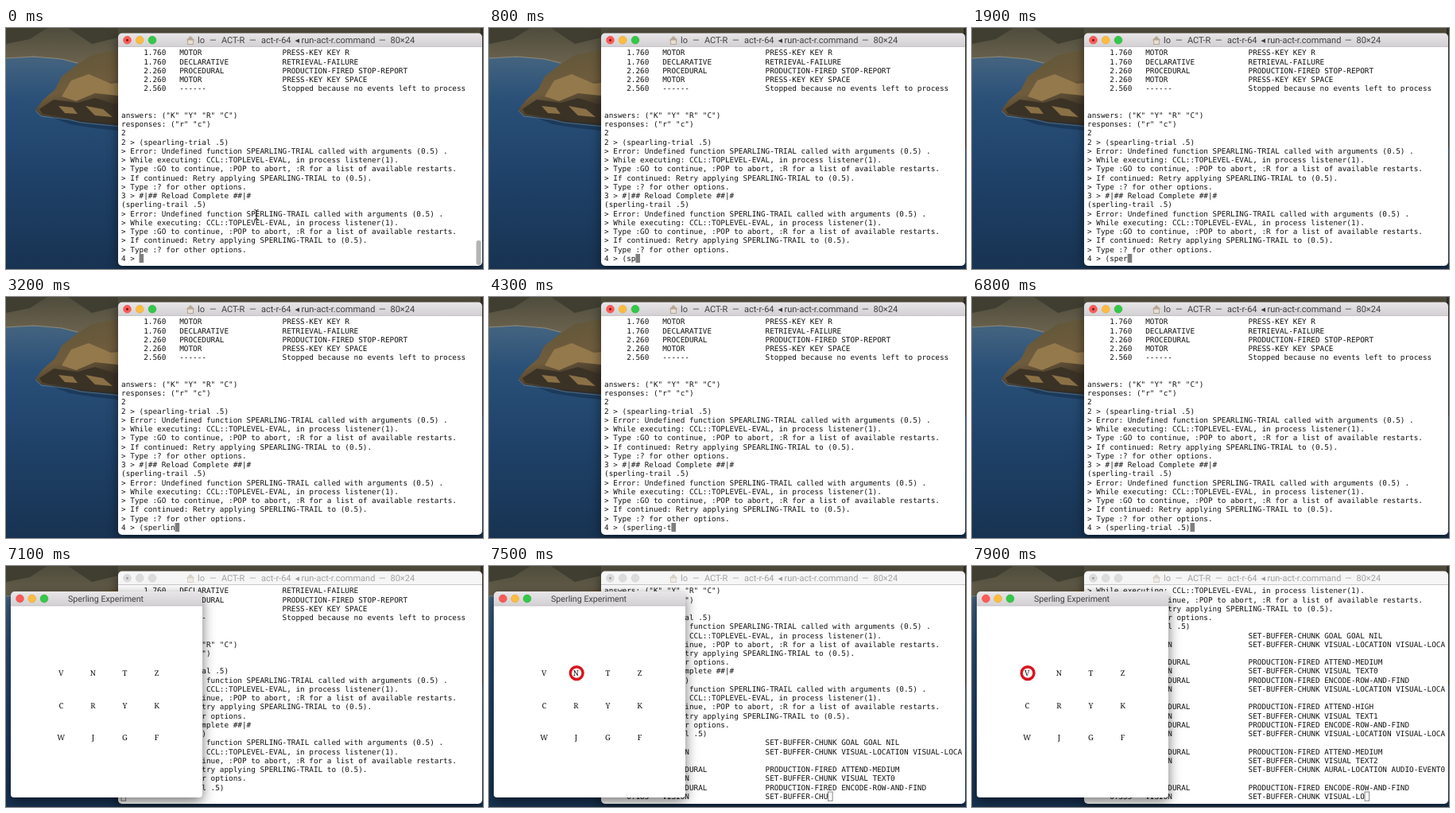
These frames come from a looping animation (600 by 303 pixels, 8 s). An HTML page:

```html
<!DOCTYPE html>
<html lang="en">
<head>
<meta charset="utf-8">
<title>Terminal session</title>
<style>
  html, body { margin: 0; width: 100%; height: 100%; overflow: hidden; background: #1c3c62; }
  svg { display: block; width: 600px; height: 303px; }
  text { text-rendering: geometricPrecision; white-space: pre; }
  #rows { font: 9.35px "DejaVu Sans Mono", monospace; fill: #111; }
  .title { font: 11px Roboto, sans-serif; fill: #404040; }
  #letters { font: 9.5px "Noto Serif", serif; fill: #111; text-anchor: middle; }
  .red { fill: #fc5b57; stroke: #df4744; }
  .yellow { fill: #fdbc40; stroke: #dea034; }
  .green { fill: #34c84a; stroke: #27aa35; }
  .lights circle { stroke-width: .5; }
  #term { filter: drop-shadow(0 4px 7px rgba(0, 0, 0, .5)); }
  #trial { filter: drop-shadow(0 5px 8px rgba(0, 0, 0, .55)); }
  #caret { fill: #7f7f7f; stroke: none; }
  .dot { fill: #7c120e; }
  .blur .lights circle { fill: #dcdcdc; stroke: #cbcbcb; }
  .blur .dot { fill: #a0a0a0; }
  .blur .title { fill: #a2a2a2; }
  .blur .bar { fill: #f6f6f6; }
  .blur .home { opacity: .45; }
  .blur #caret { fill: none; stroke: #777; stroke-width: .9; }
</style>
</head>
<body>
<svg viewBox="0 0 600 303">
  <defs>
    <linearGradient id="sea" x2="0" y2="1">
      <stop offset=".1" stop-color="#476680"/>
      <stop offset=".3" stop-color="#2a5078"/>
      <stop offset=".6" stop-color="#1f4269"/>
      <stop offset="1" stop-color="#183352"/>
    </linearGradient>
    <linearGradient id="hill" x2="0" y2="1">
      <stop offset="0" stop-color="#4f4c3c"/>
      <stop offset="1" stop-color="#6d6450"/>
    </linearGradient>
    <linearGradient id="land" x2=".3" y2="1">
      <stop offset="0" stop-color="#5d5538"/>
      <stop offset=".6" stop-color="#6f5c3d"/>
      <stop offset="1" stop-color="#352d23"/>
    </linearGradient>
    <linearGradient id="bar" x2="0" y2="1">
      <stop offset="0" stop-color="#e8e6e8"/>
      <stop offset="1" stop-color="#d2d0d2"/>
    </linearGradient>
  </defs>

  <rect width="600" height="303" fill="url(#sea)"/>
  <g id="coast">
    <path fill="url(#hill)" d="M0 0H600V12H150V48L95 46 70 39 35 36 0 38Z"/>
    <path fill="#3f3e31" d="M0 0H52L30 14 0 20Z M78 0H141V12L108 20Z"/>
    <path fill="none" stroke="#a39a85" stroke-width="1.200" opacity=".7" d="M0 38L35 36 70 39 90 44"/>
    <path fill="#14304c" opacity=".6" d="M36 104L80 121 112 126 150 130V110Z"/>
    <path fill="url(#land)" d="M150 26L108 34 88 47 70 61 62 77 46 91 37 103 44 110 78 114 95 118 150 123Z"/>
    <path fill="#94794c" d="M82 66L104 58 132 70 150 68V86L112 82 88 92 70 86Z"/>
    <path fill="#3b3226" d="M60 90L90 94 112 88 150 100V120L108 118 78 113 46 108 42 102Z"/>
    <path fill="#8a7046" d="M66 98L84 100 90 108 74 107Z M100 98L122 102 134 112 112 110Z"/>
    <path fill="none" stroke="#a9b3b0" stroke-width=".8" opacity=".5" d="M37 104L44 111 78 115 95 119 145 124"/>
    <path fill="#332d24" d="M597 0H600V150H597Z"/>
  </g>

  <g id="term">
    <path fill="#fff" d="M141 23H599V294a5 5 0 0 1 -5 5H146a5 5 0 0 1 -5 -5Z"/>
    <path class="bar" fill="url(#bar)" d="M141 23.500V11.500a5 5 0 0 1 5 -5H594a5 5 0 0 1 5 5V23.500Z"/>
    <path stroke="#b9b7b9" stroke-width=".7" d="M141 23.500H599"/>
    <g class="lights">
      <circle class="red" cx="152.500" cy="15.200" r="4.900"/>
      <circle class="yellow" cx="168.200" cy="15.200" r="4.900"/>
      <circle class="green" cx="184" cy="15.200" r="4.900"/>
    </g>
    <ellipse class="dot" cx="152.500" cy="15.200" rx="1.500" ry="1.500"/>
    <g class="home">
      <path fill="#e9dfd0" stroke="#9d8f80" stroke-width=".7" d="M228.500 15V20.500H235.500V15"/>
      <path fill="#b7a797" d="M226.500 15.500 L232 10 237.500 15.500Z"/>
    </g>
    <g class="title" id="heading"></g>
    <g id="rows"></g>
    <rect id="caret" width="5.600" height="11.200"/>
    <rect id="thumb" x="591.500" y="267" width="6" height="31" rx="3" fill="#b4b4b4"/>
    <path id="pointer" fill="none" stroke="#222" stroke-width="1" d="M312.500 228.500q2.500 0 2.500 2V239q0 2 -2.500 2M317.500 228.500q-2.500 0 -2.500 2M315 239q0 2 2.500 2M313.500 236H316.500"/>
  </g>

  <g id="trial">
    <path fill="#fff" d="M6 49H247V287a4 4 0 0 1 -4 4H10a4 4 0 0 1 -4 -4Z"/>
    <path fill="url(#bar)" d="M6 50V37a5 5 0 0 1 5 -5H242a5 5 0 0 1 5 5V50Z"/>
    <path stroke="#b9b7b9" stroke-width=".7" d="M6 50H247"/>
    <g class="lights">
      <circle class="red" cx="17.500" cy="41" r="4.900"/>
      <circle class="yellow" cx="32.700" cy="41" r="4.900"/>
      <circle class="green" cx="48" cy="41" r="4.900"/>
    </g>
    <text class="title" x="78" y="45" style="font-size:10.700px">Sperling Experiment</text>
    <g id="letters"></g>
    <circle id="focus" r="7.900" fill="none" stroke="#d9121c" stroke-width="3.400"/>
  </g>
</svg>
<script>
const LOOP = 8000, ROWS = 24, COLS = 80, CELL = 5.63, PITCH = 11.24, LEFT = 145;
const ENTER = 6900, OPEN = 7000;
const $ = id => document.getElementById(id);

function addText(parent, x, y, str = '') {
  const el = document.createElementNS('http://www.w3.org/2000/svg', 'text');
  el.setAttribute('x', x);
  el.setAttribute('y', y);
  el.textContent = str;
  return parent.appendChild(el);
}

const traceLine = (time, module, action) =>
  `     ${time}   ${module.padEnd(23)}${action}\n`;
const fired = (time, rule) => traceLine(time, 'PROCEDURAL', 'PRODUCTION-FIRED ' + rule);
const vision = (time, chunk) => traceLine(time, 'VISION', 'SET-BUFFER-CHUNK ' + chunk);
const place = n => `VISUAL-LOCATION VISUAL-LOCATION${n}-0 NIL`;

const failure = name =>
`> Error: Undefined function ${name} called with arguments (0.5) .
> While executing: CCL::TOPLEVEL-EVAL, in process listener(1).
> Type :GO to continue, :POP to abort, :R for a list of available restarts.
> If continued: Retry applying ${name} to (0.5).
> Type :? for other options.
`;

const session =
  traceLine('1.760', 'MOTOR', 'PRESS-KEY KEY R') +
  traceLine('1.760', 'DECLARATIVE', 'RETRIEVAL-FAILURE') +
  traceLine('2.260', 'PROCEDURAL', 'PRODUCTION-FIRED STOP-REPORT') +
  traceLine('2.260', 'MOTOR', 'PRESS-KEY KEY SPACE') +
  traceLine('2.560', '------', 'Stopped because no events left to process') +
  '\n\nanswers: ("K" "Y" "R" "C")\nresponses: ("r" "c")\n2\n2 > (spearling-trial .5)\n' +
  failure('SPEARLING-TRIAL') +
  '3 > #|## Reload Complete ##|#\n(sperling-trail .5)\n' +
  failure('SPERLING-TRAIL') + '4 > ';

const trace =
  traceLine('0.000', 'GOAL', 'SET-BUFFER-CHUNK GOAL GOAL NIL') +
  vision('0.000', place(0)) +
  fired('0.050', 'ATTEND-MEDIUM') +
  vision('0.135', 'VISUAL TEXT0') +
  fired('0.185', 'ENCODE-ROW-AND-FIND') +
  vision('0.185', place(1)) +
  fired('0.235', 'ATTEND-HIGH') +
  vision('0.320', 'VISUAL TEXT1') +
  fired('0.370', 'ENCODE-ROW-AND-FIND') +
  vision('0.370', place(2)) +
  fired('0.420', 'ATTEND-MEDIUM') +
  vision('0.505', 'VISUAL TEXT2') +
  traceLine('0.535', 'AUDIO', 'SET-BUFFER-CHUNK AURAL-LOCATION AUDIO-EVENT0 NIL') +
  fired('0.555', 'ENCODE-ROW-AND-FIND') +
  vision('0.555', place(3));

const command = '(sperling-trial .5)';
const keyTimes = [300, 500, 700, 1300, 1700, 2100, 2600, 3000, 3500, 3900,
  4200, 4400, 4600, 4750, 4900, 5100, 5300, 5800, 6300];

// Output reaches the terminal in buffered chunks: [time, characters so far]
const flushes = [[0, 0], [7300, 415], [7700, 1106]];
// Attended letter: [time, column, row]
const gaze = [[7235, 2, 1], [7420, 1, 0], [7605, 1, 1], [7790, 0, 0]];
const latest = (list, t) => list.filter(e => e[0] <= t).pop();

const letterX = col => 69.3 + col * 40.1;
const letterY = row => 134.8 + row * 40.5;
['VNTZ', 'CRYK', 'WJGF'].forEach((line, r) => [...line].forEach((ch, c) =>
  addText($('letters'), letterX(c), letterY(r) + 3.4, ch)));

[[241, 'lo'], [256, '—'], [271, 'ACT-R'], [306, '—'], [321, 'act-r-64'], [363.5, '◂'],
  [371.5, 'run-act-r.command'], [469, '—'], [483.5, '80×24']]
  .forEach(([x, str]) => addText($('heading'), x, 19.1, str));

const rowEls = Array.from({ length: ROWS }, (_, i) =>
  addText($('rows'), LEFT, 34.3 + i * PITCH));

let shown = null;
function print(str) {
  if (str === shown) return;
  shown = str;
  const lines = str.split('\n')
    .flatMap(l => l.match(new RegExp(`.{1,${COLS}}`, 'g')) || [''])
    .slice(-ROWS);
  rowEls.forEach((el, i) => { el.textContent = lines[i]; });
  $('caret').setAttribute('x', LEFT + lines[ROWS - 1].length * CELL);
  $('caret').setAttribute('y', 284);
}

function render(t) {
  const typed = command.slice(0, keyTimes.filter(k => k <= t).length);
  const output = t < ENTER ? '' : '\n' + trace.slice(0, latest(flushes, t)[1]);
  print(session + typed + output);

  const open = t >= OPEN;
  $('term').classList.toggle('blur', open);
  $('trial').style.display = open ? '' : 'none';
  $('pointer').style.display = t < keyTimes[0] ? '' : 'none';
  $('thumb').style.opacity = Math.max(0, Math.min(1, (500 - t) / 300));

  const spot = latest(gaze, t);
  $('focus').style.display = spot ? '' : 'none';
  if (spot) {
    $('focus').setAttribute('cx', letterX(spot[1]) + .8);
    $('focus').setAttribute('cy', letterY(spot[2]) - .2);
  }
}

const start = performance.now();
function tick() {
  render((performance.now() - start) % LOOP);
  requestAnimationFrame(tick);
}
tick();
</script>
</body>
</html>
```
